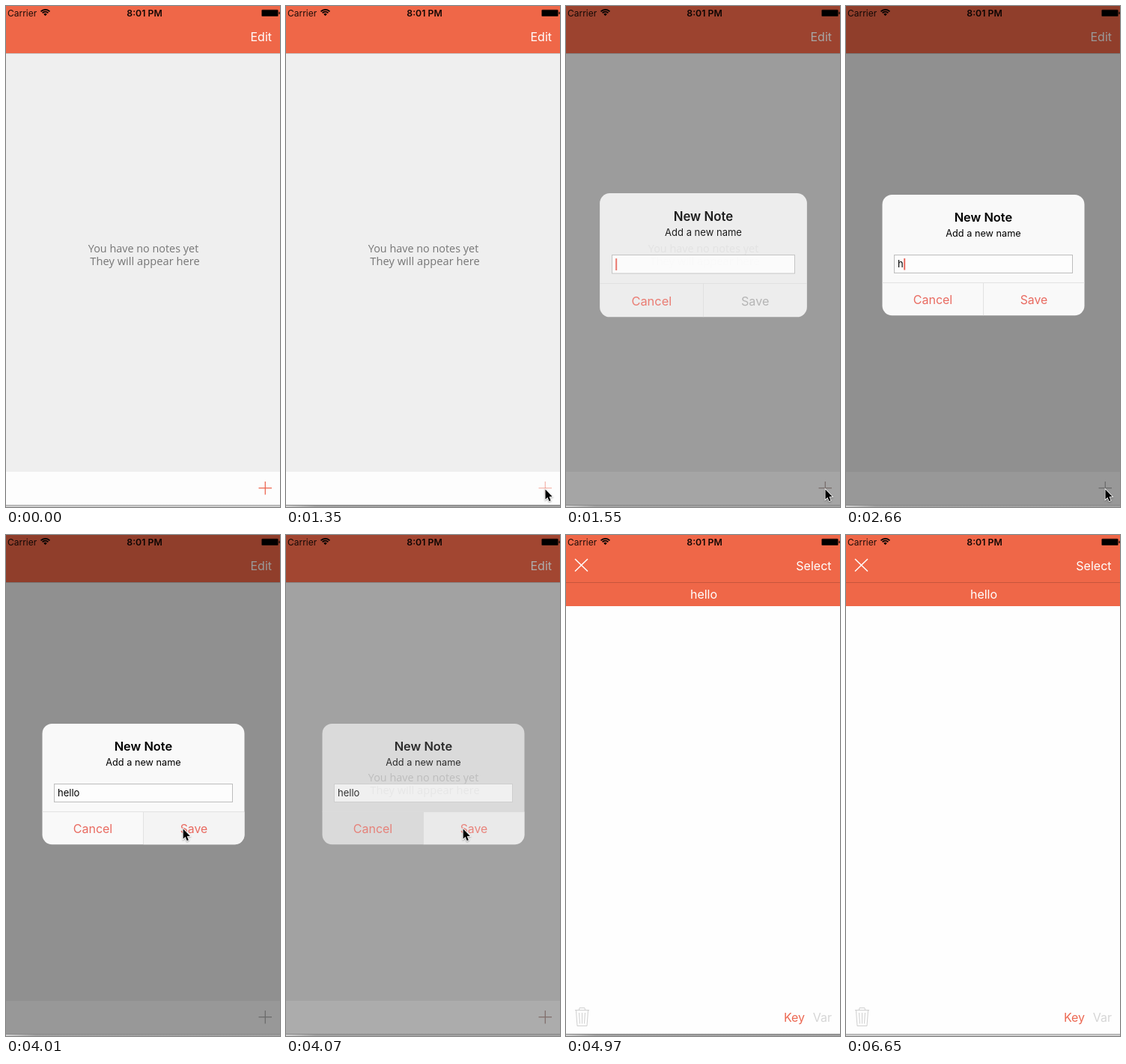
These frames come from a looping animation (366 px wide and 669 px high, 6.7 s). An HTML page with a canvas:

```html
<!DOCTYPE html>
<html lang="en">
<head>
<meta charset="utf-8">
<title>Notes</title>
<style>
html, body { margin: 0; width: 100%; height: 100%; overflow: hidden; background: #efefef; }
canvas { display: block; width: 366px; height: 669px; }
</style>
</head>
<body>
<canvas id="stage"></canvas>
<script>
const W = 366, H = 669, LOOP = 6700;
const CORAL = '#ef6748', TINT = [236, 104, 82], GRAY = [178, 178, 178];
const UI = 'Inter, sans-serif', NOTE = '"Open Sans", sans-serif';

const canvas = document.getElementById('stage');
const ctx = canvas.getContext('2d');
const dpr = window.devicePixelRatio || 1;
canvas.width = W * dpr;
canvas.height = H * dpr;

const clamp = v => Math.max(0, Math.min(1, v));
const span = (t, a, b) => clamp((t - a) / (b - a));
const ease = p => p * p * (3 - 2 * p);
const lerp = (a, b, p) => a + (b - a) * p;
const rgb = c => `rgb(${c.map(Math.round).join(',')})`;
const mix = (a, b, p) => rgb(a.map((v, i) => lerp(v, b[i], p)));

// Critically damped spring, t in ms
function spring(t) {
  if (t <= 0) return 0;
  const x = t * 0.0228;
  return 1 - (1 + x) * Math.exp(-x);
}

function rect(x, y, w, h, color) {
  ctx.fillStyle = color;
  ctx.fillRect(x, y, w, h);
}

function text(str, x, y, size, color, { align = 'left', weight = 400, font = UI } = {}) {
  ctx.font = `${weight} ${size}px ${font}`;
  ctx.textAlign = align;
  ctx.fillStyle = color;
  ctx.fillText(str, x, y);
}

function line(color, width, ...points) {
  ctx.strokeStyle = color;
  ctx.lineWidth = width;
  ctx.beginPath();
  points.forEach(([x, y]) => ctx.lineTo(x, y));
  ctx.stroke();
}

function withAlpha(alpha, draw) {
  ctx.save();
  ctx.globalAlpha *= alpha;
  draw();
  ctx.restore();
}

function statusBar() {
  text('Carrier', 2, 13.5, 12, '#1c0c08');
  text('8:01 PM', 185, 13.6, 12.3, '#140805', { align: 'center', weight: 600 });

  ctx.strokeStyle = '#000';
  ctx.lineWidth = 1.7;
  for (const r of [8.2, 5.3]) {
    ctx.beginPath();
    ctx.arc(52.5, 13, r, -Math.PI * 0.76, -Math.PI * 0.24);
    ctx.stroke();
  }
  ctx.fillStyle = '#000';
  ctx.beginPath();
  ctx.moveTo(52.5, 13.3);
  ctx.arc(52.5, 13, 3, -Math.PI * 0.76, -Math.PI * 0.24);
  ctx.fill();

  ctx.fillStyle = '#5a261a';
  ctx.beginPath();
  ctx.roundRect(341.2, 4.8, 22.6, 9.2, 1.5);
  ctx.fill();
  rect(342, 5.6, 21, 7.7, '#000');
  rect(364.4, 7.8, 1.3, 3.2, '#1c0c08');
}

function navBar() {
  rect(0, 0, W, 63, CORAL);
  rect(0, 63, W, 1, 'rgba(0,0,0,.17)');
  statusBar();
}

function listScreen(dim, pressed) {
  rect(0, 0, W, 666, '#efefef');
  navBar();
  text('Edit', 355, 47, 16, '#fff', { align: 'right' });
  const note = { align: 'center', font: NOTE };
  text('You have no notes yet', 183.5, 329, 14.4, '#767676', note);
  text('They will appear here', 185.5, 346, 14.7, '#767676', note);
  rect(0, 622, W, 44, '#fdfdfd');
  withAlpha(pressed ? 0.45 : 1, () => {
    const color = mix(TINT, GRAY, dim);
    line(color, 1.3, [337.5, 643.7], [355, 643.7]);
    line(color, 1.3, [346.3, 635], [346.3, 652.5]);
  });
}

function trash() {
  const c = '#cfcfcf';
  line(c, 1, [12, 634.5], [31, 634.5]);
  line(c, 1, [17.5, 634], [18, 631.5], [25, 631.5], [25.5, 634]);
  line(c, 1, [13.5, 635], [15, 655.5], [28, 655.5], [29.5, 635]);
  line(c, 1, [17.5, 638], [18.5, 652.5]);
  line(c, 1, [21.5, 638], [21.5, 652.5]);
  line(c, 1, [25.5, 638], [24.5, 652.5]);
}

function noteScreen() {
  rect(0, 0, W, 666, '#fefefe');
  rect(0, 63, W, 32, CORAL);
  navBar();
  line('#fff', 1.5, [12, 32], [29, 48.5]);
  line('#fff', 1.5, [29, 32], [12, 48.5]);
  text('Select', 354.5, 47, 16, '#fff', { align: 'right' });
  text('hello', 184, 85, 16, '#fff', { align: 'center' });
  trash();
  text('Key', 319, 650, 16, rgb(TINT), { align: 'right' });
  text('Var', 355, 650, 16, '#d6d6d6', { align: 'right' });
}

function caretAlpha(t) {
  if (t < 2080) return 1;
  if (t < 2430) return 0;
  if (t < 2480) return 0.5;
  return t < 3570 ? 1 : 0;
}

function alertBox(t, shown, scale, fill) {
  const cx = 183.5, cy = 332.6;
  const typed = 'hello'.slice(0, t < 2660 ? 0 : 1 + Math.floor((t - 2660) / 102));
  const tint = rgb([233, 107, 97]);
  ctx.save();
  ctx.translate(cx, cy);
  ctx.scale(scale, scale);
  ctx.translate(-cx, -cy);

  withAlpha(fill, () => {
    ctx.beginPath();
    ctx.roundRect(48.5, 252, 270, 161.3, 13);
    ctx.fillStyle = '#f9f9f9';
    ctx.fill();
    ctx.clip();
    if (t >= 3950) rect(184, 370, 135, 44, '#f4f4f4');
    rect(48, 369.3, 271, 0.8, '#dcdcdc');
    rect(183, 370, 0.8, 44, '#dcdcdc');
    rect(64, 332, 239, 25, '#fdfdfd');
    ctx.strokeStyle = '#bdbdbd';
    ctx.lineWidth = 1;
    ctx.strokeRect(64.5, 332.5, 238, 24);
  });

  withAlpha(shown, () => {
    const center = { align: 'center' };
    text('New Note', 183.4, 288, 16.4, '#000', { align: 'center', weight: 600 });
    text('Add a new name', 183.5, 308, 12.7, '#000', center);
    text(typed, 69, 349, 13, '#000');
    const caretX = 69 + ctx.measureText(typed).width + (typed ? 0.5 : 0);
    withAlpha(caretAlpha(t), () => rect(caretX, 337, 2, 15.5, tint));
    text('Cancel', 116, 398, 16, tint, center);
    text('Save', 251, 398, 15.8, typed ? tint : '#adadad', center);
  });
  ctx.restore();
}

// Window shadow under the phone
function shadowStrip(active) {
  const g = ctx.createLinearGradient(0, 666, 0, 669);
  g.addColorStop(0, active ? '#858585' : '#a6a6a6');
  g.addColorStop(1, active ? '#adadad' : '#dedede');
  rect(0, 666, W, 3, g);
  if (!active) return;
  const side = ctx.createLinearGradient(0, 0, 40, 0);
  side.addColorStop(0, 'rgba(230,230,230,.7)');
  side.addColorStop(1, 'rgba(230,230,230,0)');
  rect(0, 667, 40, 2, side);
}

function cursorAt(t) {
  const travel = (from, to, p) => from.map((v, i) => lerp(v, to[i], p));
  const plus = [346, 645], save = [236.2, 392];
  if (t < 660) return null;
  if (t < 3550) return travel([362, 664], plus, ease(span(t, 640, 1110)));
  if (t < 4240) return travel(plus, save, ease(span(t, 3520, 3930)));
  if (t < 4360) return travel(save, [300, 408], span(t, 4220, 4360));
  if (t >= 6350 && t < 6470) return travel([357, 661], [361, 665], span(t, 6350, 6470));
  return null;
}

function cursor([x, y]) {
  ctx.save();
  ctx.translate(x, y);
  ctx.scale(0.92, 0.95);
  ctx.beginPath();
  const shape = [[0.5, 0.5], [0.5, 14.5], [3.7, 11.6], [6, 17], [8.3, 16], [6, 10.8], [10.5, 10.6]];
  shape.forEach(p => ctx.lineTo(...p));
  ctx.closePath();
  ctx.shadowColor = 'rgba(0,0,0,.35)';
  ctx.shadowBlur = 2 * dpr;
  ctx.shadowOffsetY = dpr;
  ctx.strokeStyle = '#fff';
  ctx.lineWidth = 1.8;
  ctx.stroke();
  ctx.shadowColor = 'transparent';
  ctx.fillStyle = '#000';
  ctx.fill();
  ctx.restore();
}

function draw(t) {
  ctx.setTransform(dpr, 0, 0, dpr, 0, 0);
  const leaving = t >= 4035;
  const enter = spring(t - 1393);
  const shown = t >= 4360 ? 0 : leaving ? 1 - spring(t - 4035) : enter;
  const page = ease(span(t, 4630, 4960));

  if (page < 1) listScreen(shown, t >= 1350 && t < 1470);
  if (page > 0) withAlpha(page, noteScreen);
  if (shown > 0) {
    rect(0, 0, W, 666, `rgba(0,0,0,${0.4 * shown})`);
    alertBox(t, shown, leaving ? 1 : 1.2 - 0.2 * enter, leaving ? shown * shown : shown);
  }
  shadowStrip(t >= 660 && t < 6650);
  const at = cursorAt(t);
  if (at) cursor(at);
}

const start = performance.now();
function tick() {
  draw((performance.now() - start) % LOOP);
  requestAnimationFrame(tick);
}
tick();
</script>
</body>
</html>
```
